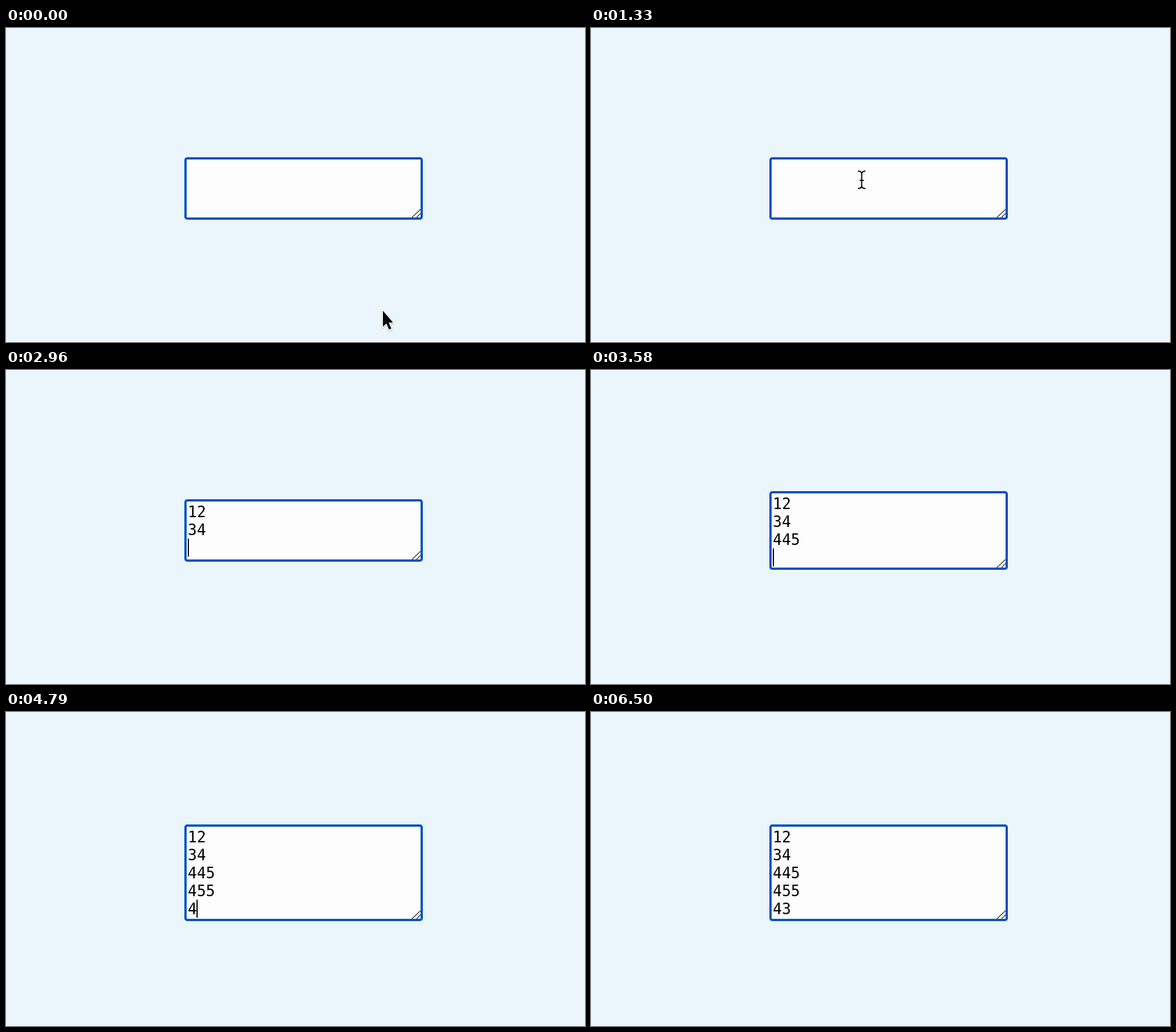
An HTML page for the animation above (6.83 s loop, 1000 by 542 pixels).

```html
<!DOCTYPE html>
<html lang="en">
<head>
<meta charset="utf-8">
<title>Growing text field</title>
<style>
  html, body { margin: 0; width: 100%; height: 100%; overflow: hidden; background: #eaf5fc; }
  svg { display: block; }
  text { font: 26px "DejaVu Sans Mono", monospace; }
  .stroke { fill: none; stroke: #000; }
</style>
</head>
<body>
<svg width="1000" height="542" viewBox="0 0 1000 542">
  <rect id="halo" x="307" width="414" rx="6" fill="#fff"/>
  <rect id="field" x="310" width="408" rx="3" fill="#fdfdfd" stroke="#0052c2" stroke-width="4"/>
  <path id="grip" class="stroke" d="M701 -4L716 -18M709 -4L716 -11" stroke-width="1.4" style="stroke:#333"/>
  <g id="lines"></g>
  <rect id="caret" width="2" height="31"/>
  <g id="pointer">
    <path id="arrow" d="M1 1V28.5L7 23L11.5 33.5L15.5 31.8L11 21.5H18.5Z" stroke="#fff" stroke-width="3" paint-order="stroke"
          style="filter:drop-shadow(0 1px 1px #0004)"/>
    <g id="beam" class="stroke" stroke-width="2">
      <path d="M-6 -15Q.5 -15 .5 -10Q.5 -15 7 -15M.5 -10V10M-6 15Q.5 15 .5 10Q.5 15 7 15M-3 1H4"/>
    </g>
    <circle id="press" class="stroke" r="33" stroke-width="3"/>
  </g>
</svg>
<script>
const LOOP = 6830, CLICK = 590, RELEASE = 710, BLINK = 500;
const LINE = 31, CHAR = 15.65, LEFT = 314;
const keys = "12\n34\n445\n455\n43";
const keyTimes = [1540, 1720, 1960, 2260, 2440, 2610, 3040, 3200, 3340, 3540,
                  3920, 4050, 4170, 4420, 4790, 5000];
const boxes = { 3: [223, 108], 4: [209, 136], 5: [194, 167] };

const el = id => document.getElementById(id);
const set = (id, attrs) => { for (const k in attrs) el(id).setAttribute(k, attrs[k]); };
const show = (id, on) => set(id, { visibility: on ? "visible" : "hidden" });

const rows = Array.from({ length: 5 }, () =>
  el("lines").appendChild(document.createElementNS("http://www.w3.org/2000/svg", "text")));

function drawField(t) {
  const typed = keyTimes.filter(k => k <= t).length;
  const text = keys.slice(0, typed).split("\n");
  const [top, height] = boxes[Math.max(3, text.length)];
  set("halo", { y: top - 1, height: height + 2 });
  set("field", { y: top + 2, height: height - 4 });
  set("grip", { transform: `translate(0 ${top + height})` });
  rows.forEach((row, i) => {
    row.textContent = text[i] || "";
    row.setAttribute("x", LEFT);
    row.setAttribute("y", top + 31 + i * LINE);
  });

  const last = text.length - 1;
  const since = t - (typed ? keyTimes[typed - 1] : CLICK);
  set("caret", { x: Math.round(LEFT + text[last].length * CHAR - 0.2), y: top + 6 + last * LINE });
  show("caret", since >= 0 && Math.floor(since / BLINK) % 2 === 0);
}

function drawPointer(t) {
  const p = Math.min(1, Math.max(0, (t - 30) / 520));
  const e = p * p * (3 - 2 * p);
  const curve = (a, b, c) => a * (1 - e) ** 2 + 2 * b * e * (1 - e) + c * e * e;
  const x = curve(650, 520, 467), y = curve(487, 380, 262);
  const visible = t < keyTimes[0], inside = y < 331;
  set("pointer", { transform: `translate(${x} ${y})` });
  show("arrow", visible && !inside);
  show("beam", visible && inside);
  show("press", t >= CLICK && t < RELEASE);
}

function frame() {
  const t = performance.now() % LOOP;
  drawField(t);
  drawPointer(t);
  requestAnimationFrame(frame);
}
frame();
</script>
</body>
</html>
```
